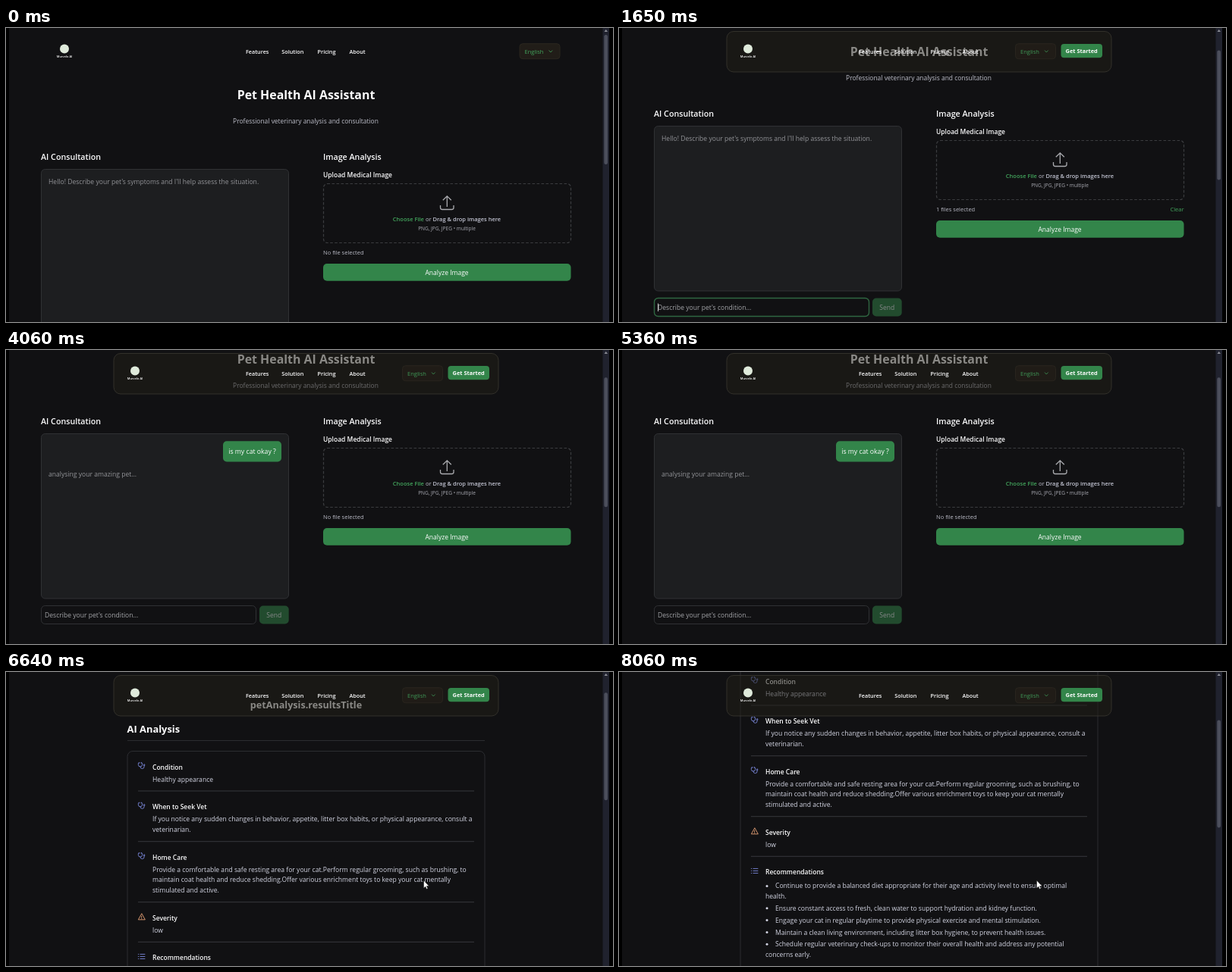
An HTML page for the animation above (8110 ms loop, 800 by 388 pixels).

```html
<!DOCTYPE html>
<html lang="en">
<head>
<meta charset="utf-8">
<title>Pet Health AI Assistant</title>
<style>
  html, body { margin: 0; width: 100%; height: 100%; overflow: hidden; background: #000; }
  svg { display: block; width: 800px; height: 388px; overflow: hidden; }
  text { font-family: "Open Sans", "Noto Sans", sans-serif; white-space: pre; }
</style>
</head>
<body>
<svg id="stage" viewBox="0 0 800 388"></svg>
<script>
const LOOP = 8110;
const WHITE = '#fcfcfd', SOFT = '#bcbdc8', GREY = '#929397', BODY = '#d3d5e3', GREEN = '#33854a', LINK = '#43a65d';

const text = (x, y, str, size = 8.58, fill = BODY, weight = 400, anchor = 'start', attrs = '') =>
  `<text x="${x}" y="${y}" font-size="${size}" fill="${fill}" font-weight="${weight}" text-anchor="${anchor}" ${attrs}>${str}</text>`;
const box = (x, y, w, h, r, fill, stroke = 'none', attrs = '') =>
  `<rect x="${x}" y="${y}" width="${w}" height="${h}" rx="${r}" fill="${fill}" stroke="${stroke}" ${attrs}/>`;
const rule = (x1, x2, y, color = '#37383c') => `<path d="M${x1} ${y}H${x2}" stroke="${color}"/>`;
const icon = (x, y, d, color) =>
  `<path transform="translate(${x} ${y}) scale(.43)" d="${d}" fill="none" stroke="${color}" stroke-width="2.2" stroke-linecap="round" stroke-linejoin="round"/>`;

const STETHOSCOPE = 'M11 2v2M5 2v2M5 3H4a2 2 0 0 0-2 2v4a6 6 0 0 0 12 0V5a2 2 0 0 0-2-2h-1M8 15a6 6 0 0 0 12 0v-3M20 8a2 2 0 1 0 0 4a2 2 0 1 0 0-4';
const WARNING = 'M12 3L2 21H22ZM12 10v5M12 18v.3';
const LIST = 'M8 5H22M8 12H22M8 19H22M2 5h1M2 12h1M2 19h1';

const consultPage = `
  ${text(395.5, 94, 'Pet Health AI Assistant', 15.9, WHITE, 700, 'middle')}
  ${text(395, 126, 'Professional veterinary analysis and consultation', 8.45, SOFT, 400, 'middle')}
  ${text(46, 173.6, 'AI Consultation', 10.7, WHITE, 600)}
  ${box(46.5, 186.5, 326, 217.5, 5, '#1d1e20', '#303134')}
  ${text(56, 206, 'Hello! Describe your pet\'s symptoms and I\'ll help assess the situation.', 8.58, GREY, 400, 'start', 'id="hello"')}
  <g id="chat">
    ${box(286, 196.3, 77, 27.2, 5, GREEN)}
    ${text(324.5, 213, 'is my cat okay ?', 8.7, WHITE, 400, 'middle')}
    ${text(56, 242.8, 'analysing your amazing pet...', 8.58, GREY)}
  </g>
  ${box(46.5, 413.5, 283, 24, 5, '#111113', '#303134', 'id="field"')}
  ${text(51, 428.8, '', 8.58, GREY, 400, 'start', 'id="typed"')}
  <path id="caret" stroke="#fff" stroke-width=".8"/>
  <g id="send">${box(334, 413.5, 38.7, 24, 5, GREEN)}${text(353.3, 428.8, 'Send', 8.5, WHITE, 400, 'middle')}</g>
  ${text(418, 173.6, 'Image Analysis', 10.7, WHITE, 600)}
  ${text(418, 196.5, 'Upload Medical Image', 8.5, WHITE, 600)}
  ${box(418.5, 205.5, 326, 78, 5, 'none', '#3b3c3f', 'stroke-width="1.2" stroke-dasharray="3.6 2.4"')}
  <path d="M572.5 234v3q0 2.5 2.5 2.5h12.5q2.5 0 2.5-2.5v-3M581.3 236v-14M575.8 227.3l5.5-5.5l5.5 5.5" fill="none" stroke="#aaabaf" stroke-width="1.3"/>
  ${text(581, 255, `<tspan fill="${LINK}" font-weight="600">Choose File</tspan> or <tspan font-weight="600">Drag &amp; drop images here</tspan>`, 7.5, '#c3c5d3', 400, 'middle')}
  ${text(581, 267.3, 'PNG, JPG, JPEG • multiple', 6.55, '#a9aab2', 400, 'middle')}
  ${text(418, 299, '', 7.5, SOFT, 400, 'start', 'id="files"')}
  ${text(744.5, 299, 'Clear', 7.5, LINK, 400, 'end', 'id="clear"')}
  ${box(418, 311, 326.5, 22.7, 5, GREEN)}
  ${text(581, 325.6, 'Analyze Image', 8.5, WHITE, 400, 'middle')}`;

const section = (y, art, title, lines, color = '#7582d0') =>
  icon(173.5, y - 10, art, color) + text(193, y, title, 8.5, WHITE, 600) +
  lines.map((line, i) => text(193, y + 16 + i * 13.6, line)).join('');
const bullet = (y, line) => `<circle cx="195" cy="${y - 3}" r="1.5" fill="${BODY}"/>` + text(206, y, line);

const resultsPage = `
  ${text(395.5, 104.6, 'petAnalysis.resultsTitle', 12.6, WHITE, 700, 'middle')}
  ${text(159.5, 136.8, 'AI Analysis', 12.9, WHITE, 700)}
  ${rule(160, 631, 147.5, '#2c2d30')}
  ${box(160, 161.5, 471, 600, 7, 'none', '#2c2d31')}
  ${section(185.5, STETHOSCOPE, 'Condition', ['Healthy appearance'])}
  ${rule(174, 617, 214)}
  ${section(238.3, STETHOSCOPE, 'When to Seek Vet', [
    'If you notice any sudden changes in behavior, appetite, litter box habits, or physical appearance, consult a', 'veterinarian.'])}
  ${rule(174, 617, 280.7)}
  ${section(304.6, STETHOSCOPE, 'Home Care', [
    'Provide a comfortable and safe resting area for your cat.Perform regular grooming, such as brushing, to',
    'maintain coat health and reduce shedding.Offer various enrichment toys to keep your cat mentally',
    'stimulated and active.'])}
  ${rule(174, 617, 360.7)}
  ${section(384.8, WARNING, 'Severity', ['low'], '#dc9a72')}
  ${rule(174, 617, 413.3)}
  ${section(437.3, LIST, 'Recommendations', [])}
  ${bullet(455.4, 'Continue to provide a balanced diet appropriate for their age and activity level to ensure optimal')}
  ${text(193, 469, 'health.')}
  ${bullet(484.8, 'Ensure constant access to fresh, clean water to support hydration and kidney function.')}
  ${bullet(500.6, 'Engage your cat in regular playtime to provide physical exercise and mental stimulation.')}
  ${bullet(516.5, 'Maintain a clean living environment, including litter box hygiene, to prevent health issues.')}
  ${bullet(532.3, 'Schedule regular veterinary check-ups to monitor their overall health and address any potential')}
  ${text(193, 546, 'concerns early.')}`;

const header = `
  ${box(32, 4.5, 727, 53.5, 2, '#211f17', '#3a3830', 'id="bar"')}
  <g id="logo"><circle cy="27.5" r="6" fill="#dfeadb"/>${text(0, 38.8, 'Murvelo AI', 3.9, WHITE, 600, 'middle')}</g>
  ${[['Features', 316], ['Solution', 363.3], ['Pricing', 410.6], ['About', 452.5]]
    .map(([label, x]) => text(x, 33.7, label, 7.25, WHITE, 600)).join('')}
  <g id="language">
    ${box(0.5, 20.7, 53, 20, 4, '#211d18', '#2b271f')}
    ${text(7, 33.7, 'English', 7.5, LINK)}
    <path d="M39 29.5l2.3 2.5l2.3-2.5" fill="none" stroke="${LINK}" stroke-width=".8"/>
  </g>
  <g id="started">${box(0, 21, 54.5, 18.3, 4, GREEN)}${text(27.2, 33, 'Get Started', 7.4, WHITE, 700, 'middle')}</g>`;

document.getElementById('stage').innerHTML = `
  ${box(4, 0, 783, 388, 0, '#111113')}
  <g id="consult">${consultPage}</g>
  <g id="results">${resultsPage}</g>
  ${header}
  ${box(786.5, 0, 8.5, 388, 0, '#20222e')}
  <path d="M788.5 5L790.7 2L793 5Z" fill="#8b8d95"/>
  ${box(788.3, 9, 4.7, 170, 2.3, '#4b4e5b', 'none', 'id="thumb"')}
  <path id="pointer" d="M550.5 275V285.3L552.8 283.2L554.3 286.5L555.9 285.8L554.4 282.6H557.5Z" fill="#fff" stroke="#111" stroke-width=".5"/>`;

const el = Object.fromEntries([...document.querySelectorAll('[id]')].map(node => [node.id, node]));
const show = (node, visible) => node.style.display = visible ? '' : 'none';
const set = (node, attrs) => { for (const key in attrs) node.setAttribute(key, attrs[key]); };

const ramp = (t, start, end) => Math.min(1, Math.max(0, (t - start) / (end - start)));
const smooth = p => p * p * (3 - 2 * p);
const easeOut = p => 1 - (1 - p) ** 3;

// Scroll moves: start, end, distance
const SCROLLS = [[760, 900, 57], [3500, 3750, 19], [5690, 5890, -76], [6210, 6420, 57], [6740, 7310, 56.5], [7350, 8060, 56.5]];
const scrollAt = t => SCROLLS.reduce((sum, [start, end, d]) => sum + d * easeOut(ramp(t, start, end)), 0);

const MESSAGE = 'is my cat okay ?';
const KEYS = [1760, 1810, 1860, 1960, 2130, 2230, 2390, 2710, 2760, 2810, 2870, 2920, 2970, 3080, 3180, 3350];
const PICKED = 300, FOCUS = 1550, SENT = 3500, RESULTS = 5690;

function drawConsult(t) {
  const sent = t >= SENT, picked = t >= PICKED && !sent;
  const typed = sent ? '' : MESSAGE.slice(0, KEYS.filter(k => k <= t).length);
  const focused = t >= FOCUS && !sent;
  show(el.hello, !sent);
  show(el.chat, sent);
  el.files.textContent = picked ? '1 files selected' : 'No file selected';
  show(el.clear, picked);
  el.typed.textContent = typed || 'Describe your pet\'s condition...';
  set(el.typed, { fill: typed ? WHITE : '#a3a4a8' });
  set(el.field, { stroke: focused ? '#2f6641' : '#303134', 'stroke-width': focused ? 1 + 0.6 * ramp(t, FOCUS, FOCUS + 150) : 1 });
  set(el.send, { opacity: typed ? 1 : 0.5 });
  show(el.caret, focused);
  const x = 51.6 + (typed ? el.typed.getComputedTextLength() : 0);
  set(el.caret, { d: `M${x} 420.5V431` });
}

function drawHeader(t) {
  const p = smooth(ramp(t, 820, 1120)) - smooth(ramp(t, 5750, 6050)) + smooth(ramp(t, 6225, 6525));
  const compact = (t >= 820 && t < 5750) || t >= 6225;
  const left = 32 + 110 * p, right = 759 - 110 * p, pad = 17 * (1 - p);
  set(el.bar, {
    x: left, width: right - left, rx: 1 + 8 * p,
    'fill-opacity': compact ? 0.15 + 0.37 * p : 0.52 * p,
    'stroke-opacity': compact ? 0.55 + 0.25 * p : 0.8 * p
  });
  set(el.logo, { transform: `translate(${left + 28 + pad})` });
  const end = right - 12 - pad;
  show(el.started, compact);
  set(el.started, { transform: `translate(${end - 54.5})` });
  set(el.language, { transform: `translate(${end - (compact ? 115 : 53.5)})`, opacity: 1 - 0.1 * p });
}

function draw(t) {
  const results = t >= RESULTS, y = scrollAt(t);
  show(el.consult, !results);
  show(el.results, results);
  show(el.pointer, results);
  if (!results) drawConsult(t);
  set(results ? el.results : el.consult, { transform: `translate(0 ${-y})` });
  set(el.thumb, { y: 9 + y * (results ? 0.32 : 0.36), height: results ? 142 : 171 });
  drawHeader(t);
}

const begin = performance.now();
function tick() {
  draw((performance.now() - begin) % LOOP);
  requestAnimationFrame(tick);
}
tick();
</script>
</body>
</html>
```
